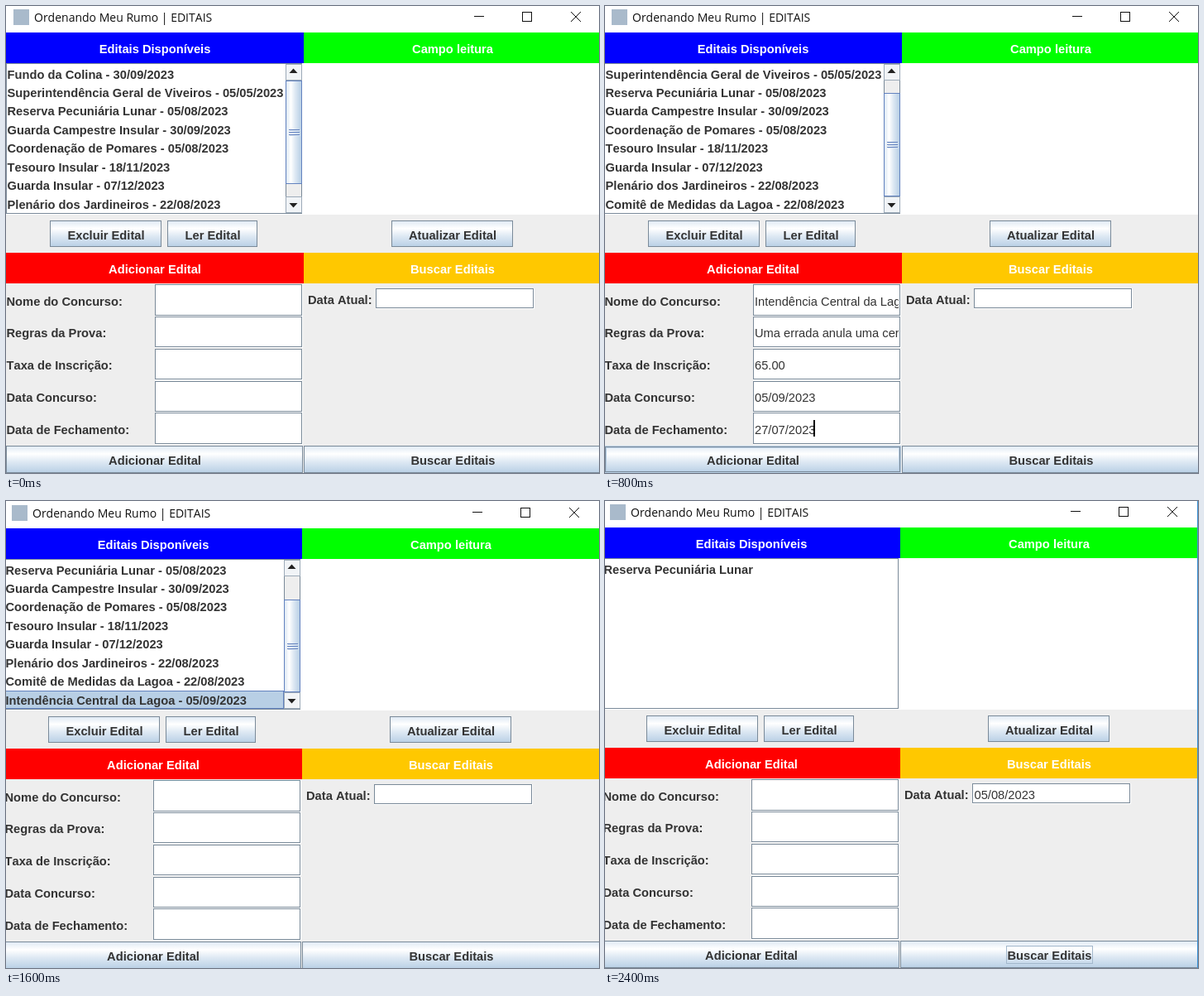
An HTML page with a canvas that plays this animation: 717x564 px, repeating every 2.8 s.

```html
<!DOCTYPE html>
<html lang="pt-BR">
<head>
<meta charset="utf-8">
<title>Editais</title>
<style>
html, body { margin: 0; width: 100%; height: 100%; overflow: hidden; background: #fff; }
canvas { display: block; }
</style>
</head>
<body>
<canvas id="stage" width="717" height="564"></canvas>
<script>
const ctx = document.getElementById('stage').getContext('2d');
const STEP = 400;
const BOLD = 'bold 14.7px "Liberation Sans", Arial, sans-serif';
const PLAIN = '14.7px "Liberation Sans", Arial, sans-serif';
const TITLE = '14px "Open Sans", "Noto Sans", sans-serif';
const INK = '#333', EDGE = '#7a8a99', PANEL = '#eee', SELECT = '#b8cfe5', FOCUS = '#a3b8cc', THUMB = '#6382bf';

const notices = [
  ['Fundo da Colina', '30/09/2023'],
  ['Superintendência Geral de Viveiros', '05/05/2023'],
  ['Reserva Pecuniária Lunar', '05/08/2023'],
  ['Guarda Campestre Insular', '30/09/2023'],
  ['Coordenação de Pomares', '05/08/2023'],
  ['Tesouro Insular', '18/11/2023'],
  ['Guarda Insular', '07/12/2023'],
  ['Plenário dos Jardineiros', '22/08/2023'],
  ['Comitê de Medidas da Lagoa', '22/08/2023'],
  ['Intendência Central da Lagoa', '05/09/2023']
];
const labels = ['Nome do Concurso:', 'Regras da Prova:', 'Taxa de Inscrição:', 'Data Concurso:', 'Data de Fechamento:'];
const entry = [notices[9][0], 'Uma errada anula uma certa', '65.00', '05/09/2023', '27/07/2023'];
const details = [
  'Nome Concurso: ' + notices[1][0],
  'RegrasProva: chegar no horario e levar caneta preta',
  'Taxa Inscricao: 100.00',
  'Data do Fechamento das inscricoes: 05/05/2023',
  'Data do Concurso: 05/09/2023'
];

// dx, dy: window position; first: top row of the list; thumb: top and bottom of the scroll thumb
const scenes = [
  { dx: 0, dy: 0, first: 0, thumb: [90, 215] },
  { dx: -2, dy: 0, first: 1, thumb: [105, 230], selected: 0, reading: true, focus: 'read' },
  { dx: -1, dy: 0, first: 1, thumb: [105, 230], form: true, caret: 'form', hover: true },
  { dx: -1, dy: 2, first: 1, thumb: [105, 230], form: true, hover: true, dialog: true },
  { dx: -2, dy: 1, first: 2, thumb: [118, 230], selected: 7, rowFocus: true },
  { dx: -1, dy: 1, first: 2, thumb: [118, 230], selected: 7, date: true, caret: 'date' },
  { dx: -3, dy: 0, found: true, date: true, focus: 'search' }
];

function fill(x, y, w, h, color) {
  ctx.fillStyle = color;
  ctx.fillRect(x, y, w, h);
}

function frame(x, y, w, h, color) {
  ctx.strokeStyle = color;
  ctx.lineWidth = 1;
  ctx.strokeRect(x + .5, y + .5, w - 1, h - 1);
}

function text(str, x, y, font = BOLD, color = INK, align = 'left') {
  ctx.font = font;
  ctx.fillStyle = color;
  ctx.textAlign = align;
  ctx.fillText(str, x, y);
}

function lines(color, ...paths) {
  ctx.strokeStyle = color;
  ctx.lineWidth = 1;
  ctx.beginPath();
  for (const [x1, y1, x2, y2] of paths) {
    ctx.moveTo(x1, y1);
    ctx.lineTo(x2, y2);
  }
  ctx.stroke();
}

function cross(x, y, color) {
  lines(color, [x, y, x + 12, y + 12], [x + 12, y, x, y + 12]);
}

function clipped(x, y, w, h, draw) {
  ctx.save();
  ctx.beginPath();
  ctx.rect(x, y, w, h);
  ctx.clip();
  draw();
  ctx.restore();
}

function sheen(x, y, w, h, sideways) {
  const g = sideways ? ctx.createLinearGradient(x, 0, x + w, 0) : ctx.createLinearGradient(0, y, 0, y + h);
  g.addColorStop(0, '#dde8f3');
  g.addColorStop(.3, '#fff');
  g.addColorStop(.6, '#dde8f3');
  g.addColorStop(1, SELECT);
  fill(x, y, w, h, g);
}

function button(label, x, y, w, h, { hover, primary, focus } = {}) {
  const mid = x + w / 2, base = Math.round(y + h / 2 + 6.5);
  sheen(x, y, w, h);
  const rings = hover ? [SELECT, EDGE, SELECT] : primary ? [EDGE, EDGE] : [EDGE];
  rings.forEach((color, i) => frame(x + i, y + i, w - 2 * i, h - 2 * i, color));
  if (focus) {
    ctx.font = BOLD;
    const tw = Math.round(ctx.measureText(label).width);
    frame(Math.round(mid - tw / 2) - 1, base - 17, tw + 3, 22, FOCUS);
  }
  text(label, mid + .5, base, BOLD, INK, 'center');
}

function field(x, y, w, h) {
  fill(x, y, w + 1, h + 1, '#fff');
  frame(x, y, w, h, EDGE);
}

function header(label, x, y, color) {
  fill(x, y, 360, 37, color);
  text(label, x + 180, y + 25, BOLD, '#fff', 'center');
}

function titleBar(inactive) {
  const color = inactive ? '#8c8c8c' : '#111';
  fill(9, 4, 19, 19, '#a9bacb');
  text('Ordenando Meu Rumo | EDITAIS', 34, 19, TITLE, color);
  lines(color, [566, 12.5, 578, 12.5]);
  frame(624, 7, 12, 12, color);
  cross(683, 7, color);
}

function arrow(x, y, dir) {
  ctx.fillStyle = '#222';
  ctx.beginPath();
  ctx.moveTo(x - 5, y + 2.5 * dir);
  ctx.lineTo(x + 5, y + 2.5 * dir);
  ctx.lineTo(x, y - 3 * dir);
  ctx.fill();
}

function scrollBar([top, bottom]) {
  fill(338, 70, 20, 180, PANEL);
  frame(338, 69, 20, 182, EDGE);
  for (const [y, dir] of [[70, 1], [230, -1]]) {
    fill(339, y, 18, 20, '#f1f4f7');
    frame(338, y, 20, 20, '#9dabb9');
    arrow(347.5, y + 9.5 - dir, dir);
  }
  sheen(339, top, 18, bottom - top, true);
  frame(338, top, 20, bottom - top, THUMB);
  const mid = Math.floor((top + bottom) / 2);
  for (let i = -1; i < 2; i++) {
    fill(342, mid + i * 3, 13, 1, THUMB);
    fill(343, mid + i * 3 + 1, 13, 1, '#d5e2f0');
  }
}

function list(s) {
  fill(0, 69, 360, 183, '#fff');
  frame(0, 69, 358, 182, EDGE);
  if (s.found) {
    text(notices[2][0], 1.5, 88);
    return;
  }
  clipped(-1, 70, 339, 180, () => {
    for (let i = 0; i < 8; i++) {
      const y = 70.5 + i * 22.45;
      if (i === s.selected) {
        fill(0, Math.round(y), 338, 22, SELECT);
        if (s.rowFocus) frame(-1, Math.round(y), 339, 22, THUMB);
      }
      text(notices[s.first + i].join(' - '), 1.5, Math.round(y + 17));
    }
  });
  scrollBar(s.thumb);
}

function form(s) {
  labels.forEach((label, i) => {
    const shift = i * 38.75;
    const top = Math.ceil(336 + shift), bottom = Math.floor(374 + shift), base = Math.floor(362 + shift);
    text(label, .5, base);
    field(180, top, 178, bottom - top);
    if (s.form) clipped(181, top, 175, 38, () => text(entry[i], 182, base, PLAIN));
  });
  if (s.caret === 'form') fill(253, 500, 2, 20, '#000');
}

function search(s) {
  text('Data Atual:', 365, 360);
  field(447, 341, 191, 24);
  if (s.date) text('05/08/2023', 449.5, 360, PLAIN);
  if (s.caret === 'date') fill(522, 344, 1, 20, '#000');
}

function infoIcon(x, y) {
  ctx.beginPath();
  ctx.arc(x + 2, y + 2, 16.5, 0, 7);
  ctx.fillStyle = '#c4c4c4';
  ctx.fill();
  ctx.beginPath();
  ctx.arc(x, y, 16, 0, 7);
  const g = ctx.createLinearGradient(0, y - 16, 0, y + 16);
  g.addColorStop(0, '#dcdcff');
  g.addColorStop(1, '#bcbcf2');
  ctx.fillStyle = g;
  ctx.fill();
  ctx.strokeStyle = '#62629a';
  ctx.lineWidth = 1.3;
  ctx.stroke();
  text('i', x, y + 9, 'bold 27px "Liberation Serif", "Noto Serif", serif', '#48487c', 'center');
}

function dialog() {
  ctx.save();
  ctx.shadowColor = 'rgba(0,0,0,.22)';
  ctx.shadowBlur = 18;
  ctx.shadowOffsetX = 4;
  ctx.shadowOffsetY = 4;
  fill(183, 202, 328, 150, PANEL);
  ctx.restore();
  fill(183, 202, 328, 37, '#fff');
  text('Message', 192, 226, TITLE, '#111');
  cross(483, 214, '#111');
  infoIcon(213, 267.5);
  text('Edital Salvo!', 254, 277);
  button('OK', 321, 302, 50, 32, { primary: true, focus: true });
}

function render(s) {
  fill(0, 0, 717, 564, '#fff');
  ctx.save();
  ctx.translate(s.dx, s.dy);
  titleBar(s.dialog);
  fill(-4, 252, 724, 312, PANEL);
  header('Editais Disponíveis', 0, 32, '#00f');
  header('Campo leitura', 360, 32, '#0f0');
  list(s);
  fill(360, 69, 360, 183, '#fff');
  if (s.reading) details.forEach((line, i) => text(line, 360, 85 + i * 20, PLAIN));
  button('Excluir Edital', 53, 259, 135, 32);
  button('Ler Edital', 195, 259, 109, 32, { hover: s.focus === 'read', focus: s.focus === 'read' });
  button('Atualizar Edital', 466, 259, 147, 32);
  header('Adicionar Edital', 0, 298, '#f00');
  header('Buscar Editais', 360, 298, '#ffc800');
  form(s);
  search(s);
  button('Adicionar Edital', 0, 531, 359, 33, { hover: s.hover });
  button('Buscar Editais', 360, 531, 360, 33, { focus: s.focus === 'search' });
  fill(719, 0, 1, 564, '#3b93d8');
  ctx.restore();
  if (s.dialog) dialog();
}

ctx.fontKerning = 'none';
const start = performance.now();
let shown = -1;

function tick() {
  const now = Math.floor((performance.now() - start) / STEP) % scenes.length;
  if (now !== shown) render(scenes[shown = now]);
  requestAnimationFrame(tick);
}
tick();
</script>
</body>
</html>
```
